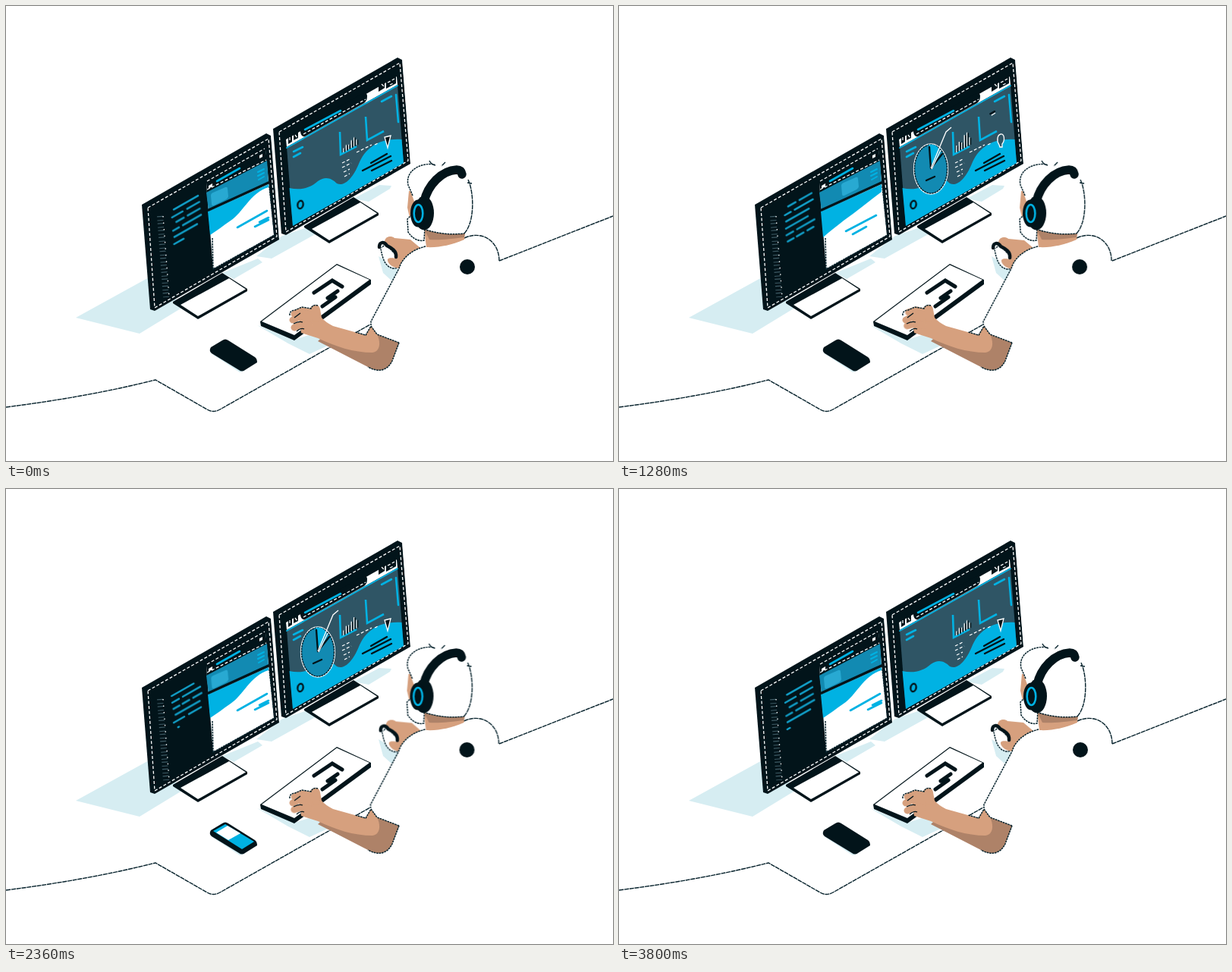
An HTML page for the animation above (3.84 s loop, 800 by 600 pixels).

```html
<!DOCTYPE html>
<html lang="en">
<head>
<meta charset="utf-8">
<title>Desk with two monitors</title>
<style>
:root { --ink: #02141a; --cyan: #00b2e3; --teal: #128ab2; --slate: #2f5565; --skin: #d6a07e; --shade: #ae8268; --pale: #d6edf2; }
html, body { margin: 0; width: 100%; height: 100%; overflow: hidden; background: #fff; }
svg { display: block; width: 800px; height: 600px; }
path, ellipse, circle { fill: none; }
.ink { fill: var(--ink); }
.white { fill: #fff; }
.cyan { fill: var(--cyan); }
.teal { fill: var(--teal); }
.slate { fill: var(--slate); }
.skin { fill: var(--skin); }
.shade { fill: var(--shade); }
.pale { fill: var(--pale); }
.line { stroke: #06222c; stroke-width: 1.4; stroke-dasharray: 6 .8; }
.edge { stroke: #06222c; stroke-width: 1.5; stroke-dasharray: 2.6 .9; }
.spark { stroke: #fff; stroke-width: 1.3; stroke-dasharray: 4 2.6; }
.c { stroke: var(--cyan); stroke-width: 2.6; stroke-linecap: round; }
.k { stroke: var(--ink); stroke-width: 2.4; stroke-linecap: round; }
.w { stroke: #fff; stroke-width: 1.3; }

#code g { animation: row 3840ms linear infinite; }
#code path { stroke: #129fc8; stroke-width: 2.5; stroke-linecap: round; stroke-dasharray: 1 3; animation: type 3840ms linear infinite; }
@keyframes row {
  0% { transform: translate(0, 0); opacity: 1; }
  3.1%, 12.5% { transform: translate(-.7px, -8.8px); }
  15.6%, 25% { transform: translate(-1.4px, -17.6px); }
  28.1%, 37.5% { transform: translate(-2.1px, -26.4px); }
  40.6%, 50% { transform: translate(-2.8px, -35.2px); }
  53.1%, 62.5% { transform: translate(-3.5px, -44px); }
  65.6%, 74.9% { transform: translate(-4.2px, -52.8px); opacity: 1; }
  75%, 100% { transform: translate(-4.2px, -52.8px); opacity: 0; }
}
@keyframes type {
  0% { stroke-dashoffset: 1.2; }
  4%, 80% { stroke-dashoffset: 0; }
  80.1%, 100% { stroke-dashoffset: 1.2; }
}

#button { fill: #28a9d2; animation: slide 1920ms ease-in-out infinite; }
@keyframes slide {
  0%, 22%, 77%, 100% { transform: translate(0, 0); }
  34%, 70% { transform: translate(23px, -13px); }
}
#hill { animation: hill 1920ms ease-in-out infinite; }
@keyframes hill {
  0%, 22%, 77%, 100% { d: path("M266 271L346 235V239C322 246 312 273 296 283C286 290 278 296 269 302Z"); }
  34%, 70% { d: path("M266 271L346 235V245C330 257 313 271 296 283C286 291 278 297 269 305Z"); }
}
.wide { animation: wide 1920ms step-end infinite; }
.mid, .late { animation: mid 3840ms step-end infinite; }
.late { animation-delay: -1920ms; }
@keyframes wide { 0% { opacity: 1; } 28% { opacity: 0; } 74% { opacity: 1; } }
@keyframes mid { 0% { opacity: 0; } 14% { opacity: 1; } 37% { opacity: 0; } }
.bulb { animation: bulb 1920ms step-end infinite; }
@keyframes bulb { 0% { opacity: 0; } 28% { opacity: 1; } 74% { opacity: 0; } }

#pie { transform-origin: 411px 215px; animation: pie 3840ms ease-in-out infinite; }
@keyframes pie {
  0%, 2% { transform: scale(0); }
  12%, 85.5% { transform: none; }
  88.5% { transform: scale(.52); }
  92%, 100% { transform: scale(0); }
}
#callout { stroke-dasharray: 1 3; animation: callout 3840ms ease-in-out infinite; }
@keyframes callout {
  0%, 9% { stroke-dashoffset: 1.1; }
  14.5%, 82% { stroke-dashoffset: 0; }
  86%, 100% { stroke-dashoffset: 1.1; }
}
#trend path { stroke-dasharray: 60 300; animation: trend 1920ms ease-in-out infinite; }
@keyframes trend {
  0%, 25% { stroke-dashoffset: 62; }
  44%, 50% { stroke-dashoffset: 0; }
  67%, 78% { stroke-dashoffset: -82; }
  88%, 100% { stroke-dashoffset: -105; }
}
#bars path { animation: bar 1920ms ease-in-out infinite; }
@keyframes bar {
  0%, 12%, 88%, 100% { transform: scaleY(.6); }
  45%, 55% { transform: scaleY(1.15); }
}
#lit { animation: lit 3840ms linear infinite; }
@keyframes lit {
  0%, 43% { opacity: 0; }
  45%, 92% { opacity: 1; }
  95%, 100% { opacity: 0; }
}
#mouse { animation: mouse 1920ms ease-in-out infinite; }
@keyframes mouse {
  0%, 100% { transform: none; }
  46% { transform: translate(3.5px, 1px); }
  70% { transform: translate(1px, 1px); }
}
#body, #head { animation: sway 1920ms ease-in-out infinite; }
@keyframes sway { 0%, 100% { transform: none; } 50% { transform: translate(-1.2px, 0); } }
.tap { transform-origin: 400px 408px; animation: tap 480ms ease-in-out infinite; }
.tap.b { animation-delay: -160ms; animation-duration: 640ms; }
.tap.d { animation-delay: -320ms; animation-duration: 960ms; }
@keyframes tap { 0%, 30%, 100% { transform: none; } 60% { transform: rotate(7deg) translate(1.5px, 0); } }
</style>
</head>
<body>
<svg viewBox="0 0 800 600">
  <defs>
    <g id="monitor">
      <path class="ink" d="M220 390L285 352L318 373V376L253 413L220 392Z"/>
      <path class="white" d="M230 394L294 359L316 373.500L253 409Z"/>
      <path class="ink" d="M179 262L343 168L349 171L360 308L196 402L190 400Z"/>
      <path class="spark" d="M187 266L346 175L357 304L196 398Z"/>
      <path class="w" style="stroke-width:.8" d="M350 173L360.500 307"/>
    </g>
  </defs>

  <path class="pale" d="M92 411L190 357L235 396L176 432ZM285 352L332 333L338 338L300 360ZM330 330L364 303L400 291L411 299L350 333ZM458 254L492 236L508 237L506 241L478 258Z"/>
  <path class="pale" d="M331 421L380 440L412 430L426 447L400 459L372 445ZM491 330L497 352L508 362L520 348ZM267 456L308 483L316 480Z"/>
  <path class="line" d="M0 529Q110 515 197 493L265 532Q273 537 282 532L480 420M650 336L800 277"/>

  <use href="#monitor"/>
  <use href="#monitor" x="173" y="-100"/>

  <!-- left screen -->
  <path stroke="#3f5a64" stroke-width="8" stroke-dasharray="1.200 4 1 3" d="M203 277L211 384"/>
  <path class="w" stroke-dasharray="1.500 7" d="M207 277L215 384"/>
  <g id="code"></g>
  <path class="white" d="M264 234L342 190L353 302L273 347Z"/>
  <path class="ink" d="M264 233L342 189L344 205L265 247Z"/>
  <path class="spark" d="M265 231L341 188M265 242L343 203"/>
  <path class="white" d="M267 237l5-3v4l-5 3ZM334 197l4-2v4l-4 2Z"/>
  <path class="c" d="M278 231L308 214"/>
  <path class="teal" d="M264 246L344 204L346 233L267 270Z"/>
  <path id="button" d="M273 246L289 239Q292 238 292 241L293 251Q293 253 290 255L274 263Q271 264 271 261L270 250Q270 247 273 246Z"/>
  <path class="c" style="stroke-width:2" d="M332 219l8-4M332 224l8-4M333 229l7-4"/>
  <path id="hill" class="cyan" d="M266 271L346 235V239C322 246 312 273 296 283C286 290 278 296 269 302Z"/>
  <path class="k" style="stroke-width:3.500;stroke-linecap:butt" d="M266 269.500L347 232.500"/>
  <path class="edge" d="M272 306L273 347L354 302L347 238"/>
  <path class="c wide" d="M305 292L344 270M328 291L346 282M334 285L346 279"/>
  <path class="c mid" d="M299 297L339 276M308 301L326 291"/>
  <path class="c late" d="M303 291L343 270M307 301L345 281M321 301L346 289"/>

  <!-- right screen -->
  <path class="white" d="M369 176L515 93L516 104L370 186Z"/>
  <path class="ink" d="M388 166Q388 161 394 158L469 116Q476 113 476 119T472 128L394 172Q389 173 388 166Z"/>
  <path class="spark" d="M392 169L474 123"/>
  <path class="c" d="M394 163L441 138"/>
  <path class="ink" d="M372 173l5-3v9l-5 3ZM379 169l6-3v8l-6 3ZM491 105l8-5v8l-8 5ZM501 99l13-8v11l-13 7Z"/>
  <path class="spark" d="M374 173v6M381 170l3 4M495 103l3 3M503 101l9-5M506 104l6-3"/>
  <path class="slate" d="M370 186L516 104L524 207L378 290Z"/>
  <path class="cyan" d="M373.500 240C387 243 400 241 411 231C421 224 429 227 436 234C447 239 458 225 465 208C473 189 489 174 521.500 176L524 207L378 290Z"/>
  <path class="c" style="stroke-width:1.800" d="M370 187L516 105"/>
  <path class="c" d="M514 117L517 153M495 126L508 119M379 192L391 186M379 199L388 194"/>
  <path class="c" style="stroke-linecap:butt" d="M440 166L441 196L462 185M474 146L476 177L498 165"/>
  <g id="bars"></g>
  <g id="trend">
    <path class="k" pathLength="100" d="M487 171L486 160L488 143L495 139"/>
    <path class="w" pathLength="100" d="M488.500 171L487.500 160L489.500 145L496 141"/>
  </g>
  <path class="spark" d="M462 193L482 183M486 183l4-2M443 207l10-5M443 213l12-6M445 219l8-4M446 225l7-4"/>
  <path class="k" d="M481 207L502 195M470 217L507 198M482 217L508 204"/>
  <g class="wide"><path class="ink w" d="M499 173L507 171L503 187Z"/></g>
  <g class="bulb"><path class="slate w" d="M501 183C497 177 499 170 503 169C508 168 509 177 505 182V186H502Z"/></g>
  <ellipse class="k" cx="388" cy="262" rx="3.600" ry="5.200" transform="rotate(12 388 262)"/>
  <g id="pie">
    <ellipse class="teal w" cx="411" cy="215" rx="22.500" ry="33"/>
    <ellipse class="edge" cx="411" cy="215" rx="21.500" ry="32"/>
    <path class="cyan" d="M411 215L408 183Q417 181 422 189Z"/>
    <path class="k" d="M411 214L409 186M411 214L426 195M405 230L416 225"/>
    <path class="w" d="M412 215L424 190"/>
  </g>
  <path id="callout" class="w" pathLength="1" d="M411 214L431 166L438 160"/>

  <!-- keyboard and phone -->
  <path class="ink" d="M335 416L436 340L481 361V367L380 441L336 422Z"/>
  <path class="white" d="M337 416L436 341.500L479 361L380 434Z"/>
  <path class="k" style="stroke-width:5" d="M406 378L430 362L443 370M424 385L437 376M417 396L434 384"/>
  <path class="ink" d="M270 450L285 441Q289 438 293 441L328 463Q331 465 331 470L315 480Q311 483 307 480L271 458Q267 455 270 450Z"/>
  <g id="lit">
    <path class="cyan" d="M273 451L289 442L327 465L311 475Z"/>
    <path class="white" d="M277 453L292 444L309 454L293 463Z"/>
  </g>

  <!-- mouse hand -->
  <g id="mouse">
    <path class="white edge" d="M494 320C496 333 500 344 510 346C519 347 522 338 516 330L500 314Z"/>
    <path class="skin" d="M499 313C498 304 507 302 512 306L533 308L546 319L524 340L518 346C509 345 502 339 503 334C506 331 511 333 515 333C517 327 509 320 499 313Z"/>
    <path class="k" style="stroke-width:4.500" d="M492 318C492 311 498 310 502 316C508 319 515 323 514 331"/>
    <path class="w" d="M494 320C500 319 506 325 509 329"/>
  </g>

  <!-- person -->
  <g id="body">
    <path class="white" d="M553 317C532 322 521 335 518 346L481 416L482 422L518 444L650 440V336C650 310 627 295 604 307Z"/>
    <path class="edge" d="M553 317C532 322 521 335 518 346L481 416V421"/>
    <path class="line" d="M604 306C627 295 650 310 650 336"/>
    <path class="skin" d="M551 294L605 298L604 308C588 315 570 319 554 318Z"/>
    <path class="shade" d="M551 294L605 298L604 305C588 307 570 309 558 308Z"/>
    <circle class="ink" cx="608" cy="344" r="10"/>
  </g>
  <g id="head">
    <path class="skin" d="M531 244L529 266L533 283L552 298L560 270L540 244Z"/>
    <path class="white edge" d="M535 275L529 281L530 298C535 306 543 311 551 309L552 292Z"/>
    <path class="white" d="M530 236C526 218 545 206 565 209C590 209 612 220 616 243C617 265 613 292 604 300C585 302 566 300 551 294L536 252Z"/>
    <path class="edge" d="M536 250L530 236C526 218 545 206 565 209M551 294C566 300 585 302 604 300"/>
    <path class="line" d="M609 229C617 246 618 285 604 300M558 204Q560 209 566 210M579 206L574 211M614 234L608 233"/>
    <path class="k" style="stroke-width:11.500" d="M551 258C556 236 574 217 594 216Q600 216 601 222"/>
    <ellipse class="ink" cx="551" cy="273" rx="13" ry="22.500"/>
    <ellipse class="ink" cx="543" cy="273.500" rx="10" ry="18"/>
    <ellipse class="c" cx="543.500" cy="273.500" rx="5.800" ry="11.500"/>
  </g>

  <!-- typing arm -->
  <path class="shade" d="M481 422L489 433L518 444L509 468C502 482 490 483 477 476L411 442L430 424L474 434Z"/>
  <path class="skin" d="M386 411L402 397Q411 391 414 400L416 411Q421 417 431 422L474 434L481 422L489 433C495 445 492 456 483 457C458 457 434 449 411 438L389 431Z"/>
  <path class="edge" d="M518 444L489 433L481 422L474 434L460 430M518 444L509 468C502 482 490 483 477 476"/>
  <g stroke="#d6a07e" stroke-width="9" stroke-linecap="round" stroke-linejoin="round">
    <path class="tap" d="M402 404L390 402L380 406"/>
    <path class="tap b" d="M402 411L389 409L378 414"/>
    <path class="tap d" d="M400 421L388 421L380 424"/>
    <path d="M409 399L409 412"/>
  </g>
  <path class="edge" d="M374 408Q373 402 381 401L390 397L402 399Q404 393 411 395"/>
  <path class="tap b" stroke="#02141a" stroke-width="1.300" d="M380 411L388 405M379 419Q386 415 391 417M383 429Q389 424 393 426"/>
</svg>
<script>
const add = (parent, tag, attrs) => {
  const el = document.createElementNS('http://www.w3.org/2000/svg', tag);
  for (const key in attrs) el.setAttribute(key, attrs[key]);
  return parent.appendChild(el);
};
const SLOPE = -.57, LOOP = 3840, STEP = LOOP / 8;

// each row: start, length pairs along the screen's x axis
const rows = [
  [0, 29], [0, 9, 14, 23], [1, 8, 13, 9, 27, 11], [3, 32],
  [0, 14, 20, 16], [5, 10, 20, 16], [0, 8, 13, 24], [1, 30]
];
const code = document.getElementById('code');
rows.forEach((row, k) => {
  const delay = -80 - (LOOP - k * STEP);
  const g = add(code, 'g', { style: `animation-delay:${delay}ms` });
  for (let i = 0; i < row.length; i += 2) {
    const [x, len] = [row[i], row[i + 1]];
    add(g, 'path', {
      d: `M${222 + x} ${320 + x * SLOPE}l${len} ${len * SLOPE}`,
      pathLength: 1, style: `animation-delay:${delay + i * 70}ms`
    });
  }
});

const bars = document.getElementById('bars');
[9, 13, 11, 17, 20, 12].forEach((h, i) => {
  const x = 445 + i * 3.4, y = 193 + (x - 445) * SLOPE;
  const style = `transform-origin:${x}px ${y}px;animation-delay:${-i % 3 * 60}ms`;
  add(bars, 'path', { class: 'w', d: `M${x} ${y}v${-h}`, style });
  add(bars, 'path', { class: 'k', d: `M${x + 1.5} ${y - 1}v${-h + 2}`, style: style + ';stroke-width:1.5' });
});
</script>
</body>
</html>
```
